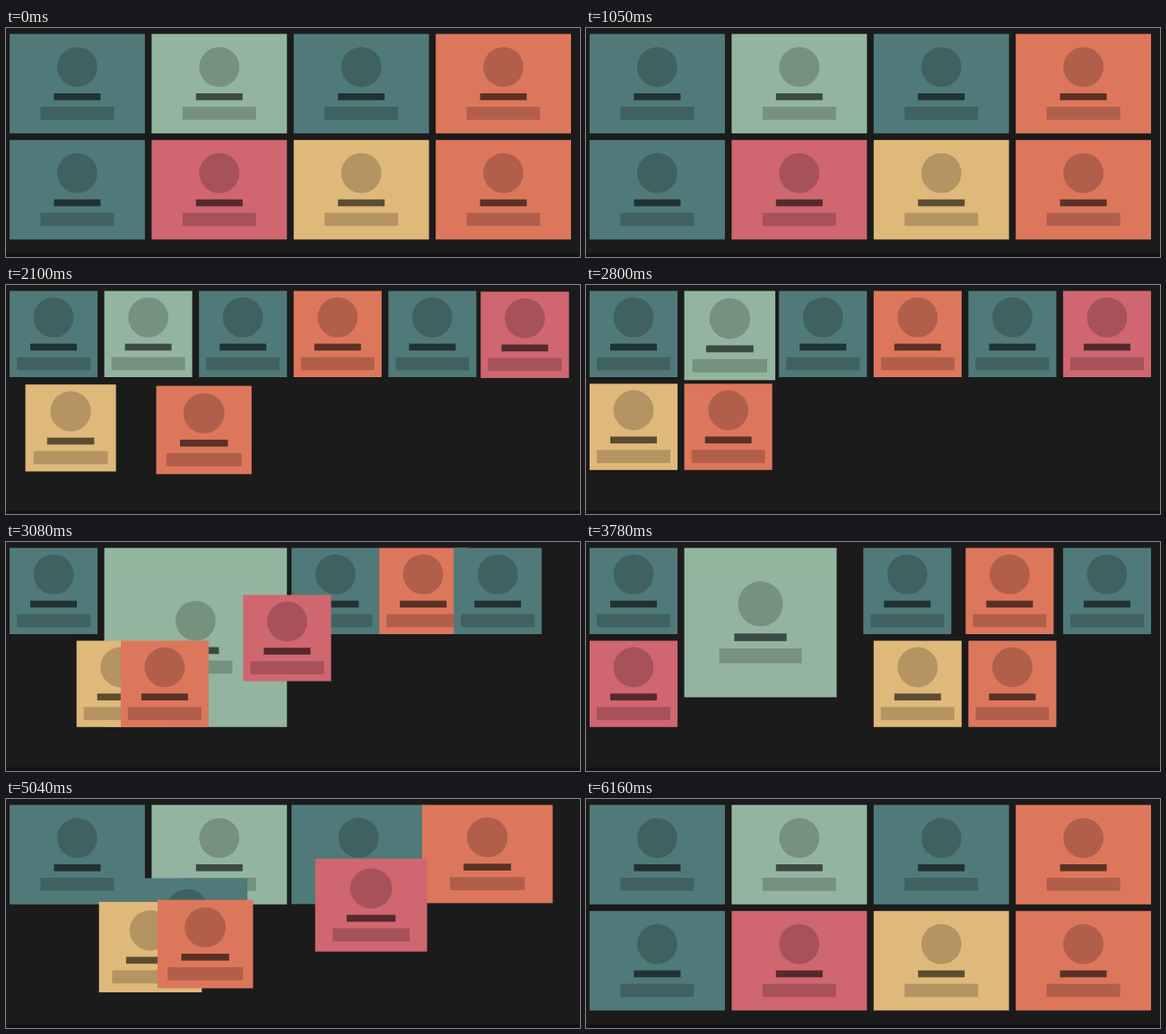
Recreate the animation shown at these times as an HTML page. Size 640 by 256 pixels, loop 6.23 s.

```html
<!DOCTYPE html>
<html lang="en">
<head>
<meta charset="utf-8">
<title>Grid cards</title>
<style>
  html, body { margin: 0; width: 100%; height: 100%; overflow: hidden; background: #1b1b1b; }
  svg { display: block; width: 100%; height: 100%; }
</style>
</head>
<body>
<svg id="stage" viewBox="0 0 640 256">
  <rect width="640" height="256" fill="#1b1b1b"/>
  <rect y="252" width="640" height="4" fill="#160f13"/>
</svg>
<script>
const LOOP = 6230;
const DURATION = 300;
const LEFT = 4, TOP = 6.6, WIDTH = 626, GAP_X = 7.5, GAP_Y = 7.4;

const teal = '#4f7a79', mint = '#93b5a0', coral = '#dd775c', rose = '#d06670', sand = '#dfb97a';
const colors = [teal, mint, teal, coral, teal, rose, sand, coral];

// Auto-places the cards; the card at index `big` spans two columns and two rows.
function layout(cols, rowHeight, big = -1) {
  const w = (WIDTH - GAP_X * (cols - 1)) / cols;
  const taken = new Set();
  let cell = 0;
  return colors.map((_, i) => {
    while (taken.has(cell)) cell++;
    const span = i === big ? 2 : 1;
    for (let r = 0; r < span; r++)
      for (let c = 0; c < span; c++) taken.add(cell + r * cols + c);
    return {
      x: LEFT + (cell % cols) * (w + GAP_X),
      y: TOP + Math.floor(cell / cols) * (rowHeight + GAP_Y),
      w: span * w + (span - 1) * GAP_X,
      h: span * rowHeight + (span - 1) * GAP_Y
    };
  });
}

const wide = layout(4, 111.2);
const narrow = layout(6, 96.4);
const expanded = layout(6, 96.4, 1);

const allDelays = [0, 42, 83, 117, 169, 200, 232, 266];
const spanDelays = [0, 0, 50, 84, 136, 167, 215, 267];

const moves = [
  { start: 1619, from: wide, to: narrow, delays: allDelays },
  { start: 2763, from: narrow, to: expanded, delays: spanDelays },
  { start: 3661, from: expanded, to: narrow, delays: spanDelays },
  { start: 4690, from: narrow, to: wide, delays: allDelays }
];

function add(parent, name, attrs) {
  const el = document.createElementNS('http://www.w3.org/2000/svg', name);
  for (const key in attrs) el.setAttribute(key, attrs[key]);
  parent.appendChild(el);
  return el;
}

const stage = document.getElementById('stage');
const cards = colors.map(fill => {
  const card = add(stage, 'g', {});
  const box = add(card, 'rect', { fill });
  const content = add(card, 'g', {});
  add(content, 'circle', { cy: -18.6, r: 22.4, 'fill-opacity': 0.2 });
  add(content, 'rect', { x: -26, y: 10.8, width: 52, height: 7.7, 'fill-opacity': 0.59 });
  add(content, 'rect', { x: -41, y: 25.8, width: 82, height: 14.7, 'fill-opacity': 0.2 });
  return { box, content };
});

const lerp = (a, b, p) => a + (b - a) * p;
const clamp = v => Math.min(1, Math.max(0, v));
const easeInOut = t => t < 0.5 ? 2 * t * t : 1 - 2 * (1 - t) * (1 - t);

// The content's counter-scale runs linearly, so it swells slightly mid-move.
function swell(from, to, p) {
  return lerp(from / to, 1, p) * lerp(to / from, 1, p);
}

function draw(time) {
  let move = moves[0];
  for (const m of moves) if (time >= m.start) move = m;

  cards.forEach(({ box, content }, i) => {
    const a = move.from[i], b = move.to[i];
    const p = easeInOut(clamp((time - move.start - move.delays[i]) / DURATION));
    const x = lerp(a.x, b.x, p), y = lerp(a.y, b.y, p);
    const w = lerp(a.w, b.w, p), h = lerp(a.h, b.h, p);
    box.setAttribute('x', x);
    box.setAttribute('y', y);
    box.setAttribute('width', w);
    box.setAttribute('height', h);
    content.setAttribute('transform',
      `translate(${x + w / 2} ${y + h / 2}) scale(${swell(a.w, b.w, p)} ${swell(a.h, b.h, p)})`);
  });
}

const begin = performance.now();
function tick() {
  draw((performance.now() - begin) % LOOP);
  requestAnimationFrame(tick);
}
tick();
</script>
</body>
</html>
```
